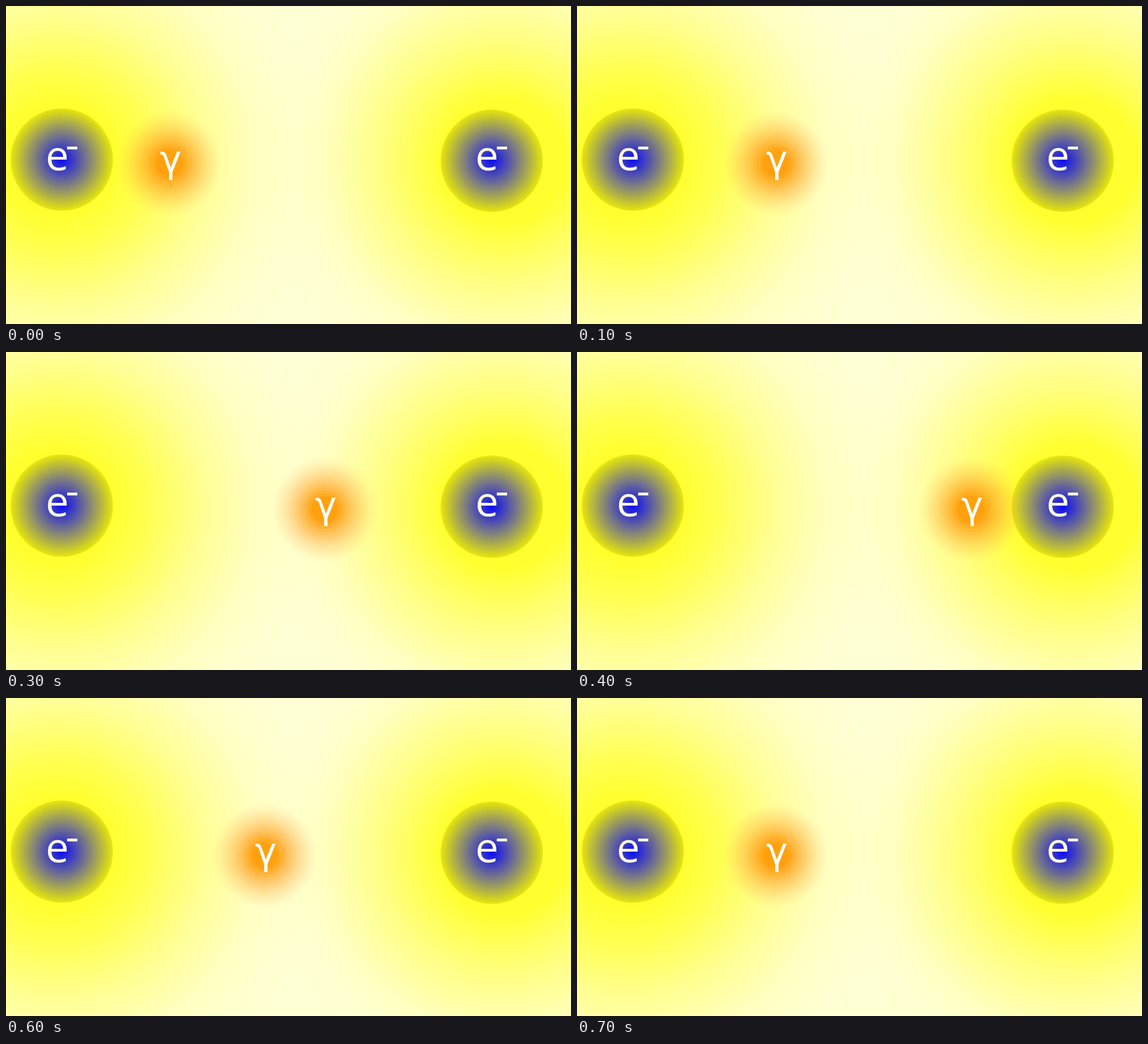
These frames come from a looping animation (998x561 px, 800 ms). An HTML page:

```html
<!DOCTYPE html>
<html lang="en">
<head>
<meta charset="utf-8">
<title>Photon exchange</title>
<style>
  html, body { margin: 0; width: 100%; height: 100%; overflow: hidden; background: #ffffd6; }
  svg { display: block; width: 100vw; height: 100vh; }
  .electron { font: 73px "Open Sans", "Noto Sans", sans-serif; }
  .photon { font: 65px "DejaVu Sans", sans-serif; }
</style>
</head>
<body>
<svg viewBox="0 0 998 561" preserveAspectRatio="none">
  <defs>
    <radialGradient id="glowLeft" gradientUnits="userSpaceOnUse" cx="90" cy="271" r="480"></radialGradient>
    <radialGradient id="glowRight" gradientUnits="userSpaceOnUse" cx="878" cy="273" r="440"></radialGradient>
    <radialGradient id="orange"></radialGradient>
    <radialGradient id="core">
      <stop offset="0" stop-color="#0c0cf4"/>
      <stop offset="0.5" stop-color="#7a7a84"/>
      <stop offset="0.97" stop-color="#e0e012"/>
      <stop offset="1" stop-color="#ecec1c"/>
    </radialGradient>
    <g id="label">
      <text class="electron" x="70" y="290" fill="#ffffe0">e</text>
      <rect x="108" y="248" width="18" height="5" fill="#ffffe8"/>
    </g>
  </defs>
  <rect width="998" height="561" fill="#ffffd6"/>
  <rect width="998" height="561" fill="url(#glowLeft)"/>
  <rect width="998" height="561" fill="url(#glowRight)"/>
  <circle cx="98.5" cy="271" r="90.5" fill="url(#core)"/>
  <circle cx="858" cy="273" r="90.5" fill="url(#core)"/>
  <use href="#label"/>
  <use href="#label" x="759"/>
  <g id="photon">
    <circle cx="-2" r="92" fill="url(#orange)"/>
    <text class="photon" y="14.5" text-anchor="middle" fill="#fff">γ</text>
  </g>
</svg>
<script>
const byId = id => document.getElementById(id);

function addStop(gradient, offset, color, alpha) {
  const stop = document.createElementNS("http://www.w3.org/2000/svg", "stop");
  stop.setAttribute("offset", offset);
  stop.setAttribute("stop-color", color);
  stop.setAttribute("stop-opacity", alpha);
  gradient.append(stop);
}

// Each pair is a radius and the blue channel left there by the yellow glow.
function fillGlow(id, radius, levels) {
  for (const [r, blue] of levels) addStop(byId(id), r / radius, "#ff0", 1 - blue / 214);
}
fillGlow("glowLeft", 480, [[0, 44], [100, 48], [160, 80], [260, 148], [350, 192], [420, 208], [480, 214]]);
fillGlow("glowRight", 440, [[0, 44], [110, 48], [165, 93], [220, 133], [320, 193], [370, 208], [440, 214]]);

// The photon fades outwards in visible rings.
const RINGS = 14;
for (let i = 0; i < RINGS; i++) {
  const u = i / RINGS;
  const color = `rgb(255, 159, ${10 + 80 * u})`;
  const alpha = 0.98 * (1 - u) ** 1.3;
  addStop(byId("orange"), i && 0.2 + 0.8 * u, color, alpha);
  addStop(byId("orange"), 0.2 + 0.8 * (i + 1) / RINGS, color, alpha);
}

const STEP = 100;
const stations = [291, 353, 459, 565, 698];
const turns = 2 * (stations.length - 1);
const photon = byId("photon");

function draw(time) {
  const step = Math.floor(time / STEP) % turns;
  const x = stations[Math.min(step, turns - step)];
  photon.setAttribute("transform", `translate(${x} 278)`);
}

let start;
function tick(now) {
  start ??= now;
  draw(now - start);
  requestAnimationFrame(tick);
}
draw(0);
requestAnimationFrame(tick);
</script>
</body>
</html>
```
